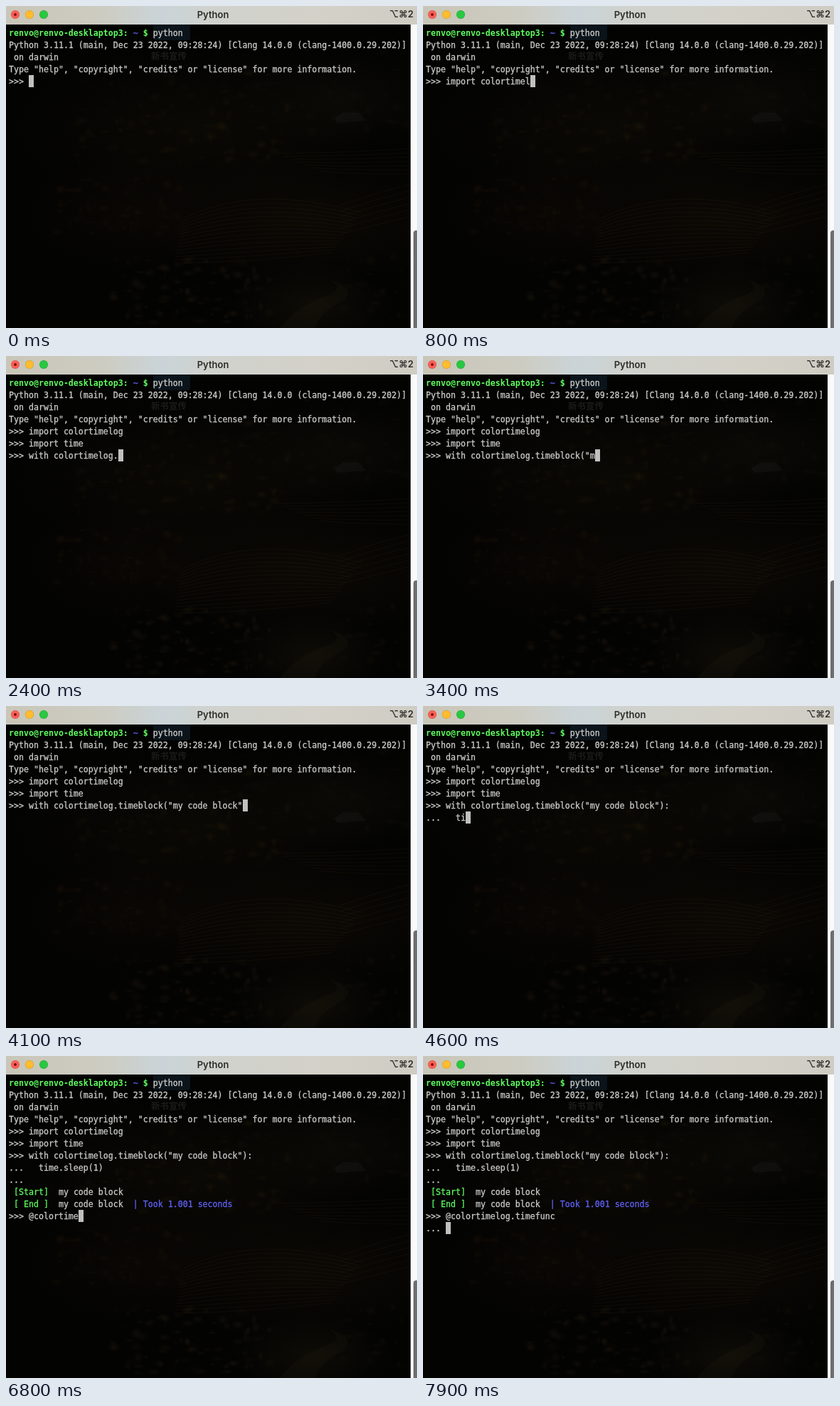
These frames come from a looping animation (578x452 px, 8000 ms). An HTML page with a canvas:

```html
<!DOCTYPE html>
<html lang="en">
<head>
<meta charset="utf-8">
<title>Python</title>
<style>
  html, body { margin: 0; width: 100%; height: 100%; overflow: hidden; background: #030302; }
  #stage { position: relative; width: 578px; height: 452px; overflow: hidden; background: #030302; }
  #stage > * { position: absolute; }
  #view { left: 0; top: 0; }

  #bar {
    left: 0; top: 0; width: 578px; height: 26px;
    background: linear-gradient(90deg, #c9c6b8, #cdccc2 24%, #cad4d8 38%, #d0d2cd 50%, #d3d1c8 75%, #cfcdc3);
    font: 600 13px/24px Inter, sans-serif; color: #2d2c2a;
  }
  #bar * { position: absolute; }
  #bar i { top: 6px; width: 12px; height: 12px; border-radius: 50%; box-shadow: inset 0 0 0 .5px #0003; }
  #bar .dot { left: 11px; top: 10px; width: 4px; height: 4px; background: #7d110b; box-shadow: none; }
  #name { left: 191px; width: 200px; text-align: center; }
  #keys { right: 5px; top: -1px; font: 600 13px/24px Inter, "DejaVu Sans", sans-serif; white-space: nowrap; }

  #label { left: 204px; top: 61px; font: 700 12.5px/18px "Noto Sans CJK SC", "Noto Sans CJK", sans-serif; color: #1b1b19; }

  #term {
    left: 4px; top: 30px;
    font: 11.627px/17px "DejaVu Sans Mono", monospace; color: #cbcbc9;
    -webkit-text-stroke: .3px;
    font-variant-ligatures: none;
  }
  #term div { height: 17px; white-space: pre; }
  #term .green, #term .bold { color: #5ffa5f; }
  #term .bold { font-weight: 700; -webkit-text-stroke: 0; }
  #term .blue { color: #6060f4; }
  #cursor { width: 7px; height: 17px; background: #c0c0be; }

  #track { left: 569px; top: 26px; width: 9px; height: 426px; background: #fafafa; }
  #thumb { left: 573px; top: 315px; width: 9px; height: 145px; border-radius: 4px; background: #6e6e6e; }
</style>
</head>
<body>
<div id="stage">
  <canvas id="view" width="578" height="452"></canvas>
  <div id="label">新书宣传</div>
  <div id="term"></div>
  <div id="cursor"></div>
  <div id="track"></div>
  <div id="thumb"></div>
  <div id="bar">
    <i style="left:7px;background:#ff5f57"></i><i class="dot"></i>
    <i style="left:27px;background:#febc2e"></i>
    <i style="left:47px;background:#28c840"></i>
    <span id="name">Python</span>
    <span id="keys">⌥⌘2</span>
  </div>
</div>
<script>
const LOOP = 8000, STEP = 100, CHAR = 7, ROW = 17, LEFT = 4, TOP = 29;

// Each row is a list of [text, class] runs.
const rows = [
  [["renvo@renvo-desklaptop3:", "bold"], [" "], ["~", "blue"], [" "], ["$", "bold"], [" python"]],
  [["Python 3.11.1 (main, Dec 23 2022, 09:28:24) [Clang 14.0.0 (clang-1400.0.29.202)]"]],
  [[" on darwin"]],
  [['Type "help", "copyright", "credits" or "license" for more information.']],
  [[">>> import colortimelog"]],
  [[">>> import time"]],
  [['>>> with colortimelog.timeblock("my code block"):']],
  [["...   time.sleep(1)"]],
  [["... "]],
  [[" "], ["[Start]", "green"], ["  my code block"]],
  [[" "], ["[ End ]", "green"], ["  my code block  "], ["| Took 1.001 seconds", "blue"]],
  [[">>> @colortimelog.timefunc"]],
  [["... "]]
];

// Cursor keys: time, row, column. Typing runs evenly between keys on one row.
const keys = [
  [0, 4, 4], [900, 4, 23],
  [1000, 5, 4], [1500, 5, 15],
  [1600, 6, 4], [1800, 6, 9], [2200, 6, 21], [2300, 6, 21], [2400, 6, 22], [2500, 6, 22],
  [2700, 6, 26], [2800, 6, 26], [3100, 6, 32], [3300, 6, 32], [3400, 6, 34],
  [3900, 6, 46], [4000, 6, 46], [4300, 6, 49],
  [4400, 7, 4], [4600, 7, 8], [4900, 7, 14], [5300, 7, 19],
  [5400, 8, 4], [5600, 10, 0],
  [5700, 11, 4], [6200, 11, 4], [6700, 11, 10], [6800, 11, 14], [7200, 11, 18], [7600, 11, 26],
  [7700, 12, 4]
];

const $ = id => document.getElementById(id);

const lines = rows.map(runs => {
  const line = document.createElement("div");
  for (const [text, kind] of runs) {
    const el = document.createElement("span");
    if (kind) el.className = kind;
    el.textContent = text;
    line.append(el);
  }
  $("term").append(line);
  return line;
});

function cursorAt(t) {
  let i = keys.length - 1;
  while (keys[i][0] > t) i--;
  const [t0, row, col] = keys[i], next = keys[i + 1];
  if (!next || next[1] !== row) return [row, col];
  return [row, Math.round(col + (next[2] - col) * (t - t0) / (next[0] - t0))];
}

function draw(t) {
  const [row, col] = cursorAt(t);
  lines.forEach((line, i) => {
    line.style.visibility = i > row || (i === row && !col) ? "hidden" : "visible";
    if (i < 4 || rows[i].length > 1) return;
    const text = rows[i][0][0];
    line.firstChild.textContent = i === row ? text.slice(0, col) : text;
  });
  $("cursor").style.left = LEFT + col * CHAR + "px";
  $("cursor").style.top = TOP + row * ROW + "px";
}

// Dim landscape behind the terminal.
function paintView() {
  const c = $("view").getContext("2d");
  let seed = 7;
  const rnd = () => (seed = seed * 16807 % 2147483647) / 2147483647;

  function glow(x, y, rx, ry, rgb, a) {
    c.save();
    c.translate(x, y);
    c.scale(rx, ry);
    const g = c.createRadialGradient(0, 0, 0, 0, 0, 1);
    g.addColorStop(0, `rgba(${rgb},${a})`);
    g.addColorStop(1, `rgba(${rgb},0)`);
    c.fillStyle = g;
    c.fillRect(-1, -1, 2, 2);
    c.restore();
  }
  function leaves(n, x, y, w, h, rgb, a) {
    for (let i = 0; i < n; i++)
      glow(x + rnd() * w, y + rnd() * h, 3 + rnd() * 8, 2 + rnd() * 6, rgb, a * rnd());
  }
  function curve(x0, y0, cx, cy, x1, y1) {
    c.beginPath();
    c.moveTo(x0, y0);
    c.quadraticCurveTo(cx, cy, x1, y1);
    c.stroke();
  }

  c.fillStyle = "#030302";
  c.fillRect(0, 0, 578, 452);
  glow(270, 170, 260, 110, "20,16,7", .45);
  glow(470, 130, 150, 70, "17,15,9", .5);
  glow(420, 300, 230, 90, "20,15,7", .55);
  glow(180, 290, 150, 80, "20,13,6", .4);
  glow(430, 420, 110, 60, "24,21,11", .5);
  leaves(140, 100, 80, 300, 140, "30,22,8", .4);
  leaves(60, 330, 60, 240, 120, "24,19,11", .35);
  leaves(80, 70, 240, 180, 80, "30,18,7", .35);
  leaves(120, 150, 350, 230, 95, "32,24,12", .45);
  leaves(30, 470, 350, 100, 90, "24,20,10", .4);

  c.lineWidth = 1;
  c.strokeStyle = "rgba(44,32,14,.3)";
  for (let i = 0; i < 7; i++) curve(380 + i * 10, 207 + i * 4, 480, 206 + i * 5, 569, 200 + i * 6);
  for (let i = 0; i < 15; i++) curve(250 - i, 298 + i * 4.5, 350, 248 + i * 8, 500 - i * 3, 290 + i * 4);
  for (let i = 0; i < 6; i++) curve(470, 280 + i * 8, 520, 262 + i * 9, 569, 250 + i * 9);

  // Farmhouse, path and the folder icon.
  c.fillStyle = "rgba(34,34,35,.28)";
  c.beginPath();
  c.moveTo(462, 158); c.lineTo(474, 149); c.lineTo(497, 150); c.lineTo(506, 161); c.lineTo(466, 164);
  c.fill();
  c.fillStyle = "rgba(36,32,18,.2)";
  c.beginPath();
  c.moveTo(385, 452);
  c.quadraticCurveTo(410, 420, 455, 405);
  c.quadraticCurveTo(475, 396, 455, 384);
  c.quadraticCurveTo(495, 396, 474, 414);
  c.quadraticCurveTo(440, 430, 435, 452);
  c.fill();
  c.fillStyle = "#0a141a";
  c.beginPath();
  c.roundRect(207, 20, 52, 28, 3);
  c.fill();
}

function tick(now) {
  draw(Math.floor(now % LOOP / STEP) * STEP);
  requestAnimationFrame(tick);
}

paintView();
draw(0);
requestAnimationFrame(tick);
</script>
</body>
</html>
```
